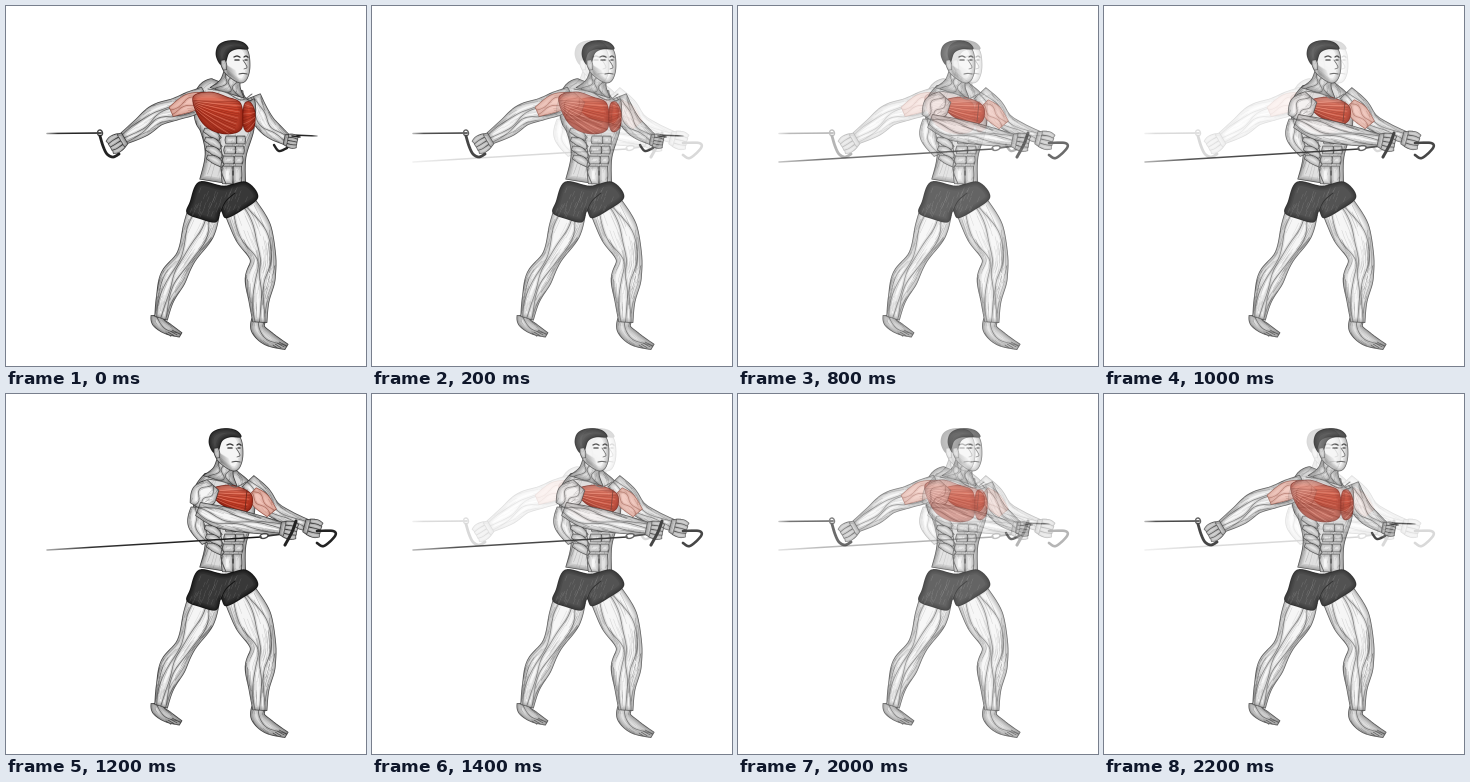
An HTML page with a canvas that plays this animation: 360x360 px, repeating every 2400 ms.

```html
<!DOCTYPE html>
<html lang="en">
<head>
<meta charset="utf-8">
<title>Cable press</title>
<style>
html, body { margin: 0; width: 100%; height: 100%; overflow: hidden; background: #fff; }
canvas { display: block; width: 100vw; height: 100vh; }
</style>
</head>
<body>
<canvas id="stage"></canvas>
<script>
const SIZE = 360, STEP = 200, HALF = 6;
const scale = Math.max(2, window.devicePixelRatio || 1);
const start = performance.now();

const looks = {
  skin:  { fill: '#f5f5f5', ink: '35,35,35', rim: .1 },
  dim:   { fill: '#dcdcdc', ink: '25,25,25', rim: .12 },
  pink:  { fill: '#f1c3b8', ink: '135,60,45', rim: .06 },
  red:   { fill: '#cf4b33', ink: '100,14,4', rim: .12 },
  cloth: { fill: '#383838', ink: '5,5,5', rim: .16 },
  hair:  { fill: '#484848', ink: '10,10,10', rim: .15 }
};

let g, seed;
const rand = () => (seed = seed * 16807 % 2147483647) / 2147483647;
const points = text => text.split(' ').map(p => p.split(',').map(Number));

// Catmull-Rom value through a list of keys, t in 0..1
function along(keys, t, closed) {
  const n = keys.length, u = t * (closed ? n : n - 1);
  const i = Math.min(Math.floor(u), closed ? n : n - 2), f = u - i;
  const at = j => closed ? keys[(j + n) % n] : keys[Math.max(0, Math.min(n - 1, j))];
  const [a, b, c, d] = [at(i - 1), at(i), at(i + 1), at(i + 2)];
  return b.map((v, k) => v + f / 2 * (c[k] - a[k] + f * (2 * a[k] - 5 * v + 4 * c[k] - d[k]
    + f * (3 * (v - c[k]) + d[k] - a[k]))));
}

function trace(count, place) {
  const path = new Path2D();
  for (let i = 0; i <= count; i++) path.lineTo(...place(i / count));
  return path;
}

function ink(path, width, color) {
  g.lineWidth = width;
  g.strokeStyle = color;
  g.stroke(path);
}

// Filled form with a rim that darkens outward; detail is drawn inside it
function solid(path, name, detail, fill) {
  const look = looks[name];
  g.fillStyle = fill || look.fill;
  g.fill(path);
  g.save();
  g.clip(path);
  for (const w of [9, 6, 3.5, 1.8]) ink(path, w, `rgba(${look.ink},${look.rim})`);
  if (detail) detail(look.ink);
  g.restore();
  ink(path, .7, `rgba(${look.ink},.8)`);
}

function shape(text, name, detail, fill) {
  const keys = points(text);
  solid(trace(keys.length * 8, t => along(keys, t, true)), name, detail, fill);
}

function line(text, width = .7, color = '#555') {
  const keys = points(text);
  ink(trace(keys.length * 6, t => along(keys, t)), width, color);
}

// Body part from "x,y,radius" keys, with muscle grooves and pencil strokes
function limb(text, name = 'skin', grooves = 2, hairs = 26) {
  const keys = points(text), eps = .01;
  const at = (t, s) => {
    const [x, y, r] = along(keys, t);
    const a = along(keys, Math.max(0, t - eps)), b = along(keys, Math.min(1, t + eps));
    const dx = b[0] - a[0], dy = b[1] - a[1], k = r * s / Math.hypot(dx, dy);
    return [x - dy * k, y + dx * k];
  };
  const outline = trace(80, v => v < .5 ? at(v * 2, 1) : at(2 - v * 2, -1));
  outline.closePath();
  solid(outline, name, tone => {
    for (let i = 1; i <= grooves; i++) {
      const s = i / (grooves + 1) * 2 - 1;
      const groove = trace(30, t => at(t, s + .22 * Math.sin(t * 9 + i * 2)));
      ink(groove, 3.2, `rgba(${tone},.12)`);
      ink(groove, .8, `rgba(${tone},.55)`);
    }
    for (let i = 0; i < hairs; i++) {
      const s = 1 - 2 * rand(), t = rand() * .85, len = .08 + rand() * .14;
      const hair = trace(6, u => at(Math.min(1, t + u * len), s + .12 * u));
      ink(hair, .5, `rgba(${tone},${.15 + .4 * s * s})`);
    }
  });
}

// Fibres spreading from one point to a line
const fan = (from, to, count) => tone => {
  const [p] = points(from), [a, b] = points(to);
  for (let i = 0; i <= count; i++) {
    const x = a[0] + (b[0] - a[0]) * i / count, y = a[1] + (b[1] - a[1]) * i / count;
    const path = new Path2D();
    path.moveTo(...p);
    path.quadraticCurveTo((p[0] + x) / 2, (p[1] + y) / 2 + i / count * 6, x, y);
    ink(path, .6, `rgba(${i % 3 ? tone : '255,190,170'},.4)`);
  }
};

function pec(text, top, detail) {
  const fade = g.createLinearGradient(0, top, 0, top + 30);
  ['#efbcae', '#d8614a', '#c63f28', '#b53a26'].forEach((c, i) => fade.addColorStop(i / 3, c));
  shape(text, 'red', detail, fade);
}

function fist(x, y, r, turn) {
  g.save();
  g.translate(x, y);
  g.rotate(turn);
  limb(`${-r},0,${r * .7} 0,0,${r} ${r * .8},0,${r * .7}`, 'dim', 0, 8);
  for (let i = -1.5; i < 2; i++)
    limb(`${-r * .5},${i * r * .46},${r * .2} ${r * .3},${i * r * .5},${r * .27} ${r * .9},${i * r * .4},${r * .2}`, 'skin', 0, 0);
  g.restore();
}

// Cable that fades in from its far end
function cable(x1, y1, x2, y2) {
  const tone = g.createLinearGradient(x1, y1, x2, y2);
  tone.addColorStop(0, '#aaa');
  tone.addColorStop(.2, '#333');
  tone.addColorStop(1, '#111');
  ink(trace(1, t => [x1 + (x2 - x1) * t, y1 + (y2 - y1) * t]), 1.5, tone);
}

function clasp(x, y, rx, ry) {
  const path = new Path2D();
  path.ellipse(x, y, rx, ry, -.2, 0, 7);
  ink(path, 1.4, '#444');
}

function foot(text, tipX, tipY) {
  limb(text, 'dim', 1, 14);
  for (let i = 0; i < 4; i++)
    line(`${tipX - 8 - i * 2},${tipY - 4 + i} ${tipX - i * 3},${tipY + i * .8}`, .7, '#444');
}

function lower() {
  seed = 71;
  foot('151,309,6 152,316,6 162,323,5.5 175,329,2.5', 174, 328);
  limb('198,205,16 192,226,16 180,251,10 167,272,13 159,293,9 155,313,6.5', 'skin', 3, 80);
  foot('253,312,7 252,323,7 263,333,7 281,341,3', 281, 340);
  limb('234,201,17 247,226,19 257,252,13 254,274,15 253,296,10 254,317,7', 'skin', 3, 90);

  for (let i = 0; i < 4; i++)
    limb(`${198 + i},${124 + i * 9},2 ${206 + i},${127 + i * 9},4 ${214 + i},${133 + i * 9},2`, 'skin', 0, 5);
  for (let i = 0; i < 4; i++) {
    const y = 130 + i * 10, x = 231 - i * 1.2, tall = i > 2 ? 18 : 8;
    limb(`${x - 6},${y},5 ${x - 6},${y + tall / 2},6 ${x - 6},${y + tall},5`, 'skin', 0, 6);
    limb(`${x + 4},${y},4 ${x + 4},${y + tall / 2},4.5 ${x + 4},${y + tall},4`, 'skin', 0, 6);
  }
  line('213,130 216,150 215,164 220,178', 1, '#555');
  line('227,165 227,169', 1.5, '#333');

  shape('193,176 184,196 181,207 195,213 210,216 215,205 220,212 236,204 252,191 240,176 218,180', 'cloth', () => {
    for (let i = 0; i < 60; i++) {
      const x = 184 + rand() * 62, y = 180 + rand() * 28;
      line(`${x},${y} ${x - 2},${y + 5}`, .5, 'rgba(190,190,190,.25)');
    }
  });
  line('215,205 220,195 229,187', .9, '#111');
}

function head() {
  limb('227,66,9 224,77,10.5 221,87,18', 'dim', 3, 24);
  shape('214,50 220,39 233,37 242,45 244,61 241,73 235,77 226,73 217,64', 'skin', tone => {
    for (let i = 0; i < 12; i++)
      line(`${218 + i},${58 + i * .6} ${222 + i},${68 + i * .7}`, 1.6, `rgba(${tone},${.22 - i * .016})`);
  });
  shape('210,49 212,40 219,35.5 229,34.5 238,37 242,43 231,43 223,47 219,58 214,58', 'hair');
  limb('217,54,2 218,59,2.8 219,64,1.5', 'skin', 0, 2);
  for (const [x, w] of [[231, 3], [240, 2]]) {
    line(`${x - w},51 ${x},50 ${x + w},51.2`, 1.3, '#333');
    line(`${x - w + 1},54 ${x + w - 1},54`, 1.5, '#444');
  }
  line('237,54 241,61 238,63', .8);
  line('233,68 237,67.4 241,68', 1.1, '#555');
}

function openPose() {
  cable(311, 130, 286, 129);
  limb('246,91,9 252,106,10 260,118,9.5 269,126,8.5 281,134,5.5', 'skin', 2, 40);
  limb('222,79,16 218,90,29 219,107,31 221,124,27 219.5,150,20.5 216.5,178,23.5', 'dim', 0, 60);
  lower();
  head();
  limb('200,89,9 186,97,12 170,103,11 151,109,11 136,121,10 117,133,6', 'skin', 3, 60);
  limb('200,92,6 183,97,9 165,106,5', 'pink', 2, 14);
  pec('187,91 204,86 221,91 235,98 236,122 222,128 205,124 193,112', 84, fan('180,94', '237,94 226,134', 20));
  pec('238,99 244,96 249,106 248,121 241,126 237,118', 86, fan('256,104', '237,98 237,128', 9));
  line('202,83 219,86 235,94 246,88', 1, '#666');

  cable(41, 127.5, 95, 127);
  clasp(94, 127, 2.5, 3);
  line('94,130 97,140 101,148 107,151 113,148', 2.8, '#222');
  fist(111, 137, 9, 2.6);
  line('268,139 273,145 281,142', 2.4, '#222');
  fist(285, 135, 7, .2);
  line('286,130 294,131', 1.4, '#222');
}

function closedPose() {
  limb('215,78,16 216,90,27 218,106,31 220,124,28 219.5,150,20.5 216.5,178,23.5', 'dim', 0, 60);
  limb('190,113,5 190,130,8 200,149,4', 'skin', 1, 20);
  lower();
  g.save();
  g.translate(-7, 0);
  head();
  g.restore();
  limb('242,87,8 255,101,10 267,115,8 283,124,7 300,131,6', 'skin', 2, 40);
  limb('246,98,6 255,107,9 266,119,6', 'pink', 2, 14);
  pec('204,96 222,91 238,95 246,102 245,114 236,119 224,115 212,108', 88, fan('198,98', '246,94 238,124', 16));
  line('202,85 218,88 229,93 240,88', 1, '#666');
  line('241,96 239,116', .9, '#72291d');

  limb('207,91,8 198,101,13 191,113,8', 'skin', 2, 30);
  limb('192,115,7 214,123,11 244,129,10 278,135,6', 'skin', 3, 50);

  cable(41, 156, 255, 143);
  clasp(258, 142, 4.2, 2.3);
  line('262,142 284,139', 1.6, '#333');
  fist(307, 134, 9, .25);
  line('311,137 327,137 329,142 318,152 311,149', 2.6, '#222');
  fist(283, 136, 9, .2);
  line('290,127 286,138 279,151', 3, '#222');
}

function picture(draw) {
  const c = document.createElement('canvas');
  c.width = c.height = SIZE * scale;
  g = c.getContext('2d');
  g.scale(scale, scale);
  g.lineCap = g.lineJoin = 'round';
  seed = 29;
  draw();
  return c;
}

const stage = document.getElementById('stage');
stage.width = stage.height = SIZE * scale;
const ctx = stage.getContext('2d');
const open = picture(openPose), closed = picture(closedPose);

// Stepped cross-fade: six steps there, six back
function show(time) {
  const k = Math.floor(time / STEP) % (2 * HALF);
  const mix = 1 - Math.abs(k - HALF) / HALF;
  ctx.clearRect(0, 0, stage.width, stage.height);
  ctx.globalAlpha = 1 - mix;
  ctx.drawImage(open, 0, 0);
  ctx.globalAlpha = mix;
  ctx.drawImage(closed, 0, 0);
}

function tick() {
  show(performance.now() - start);
  requestAnimationFrame(tick);
}
tick();
</script>
</body>
</html>
```
